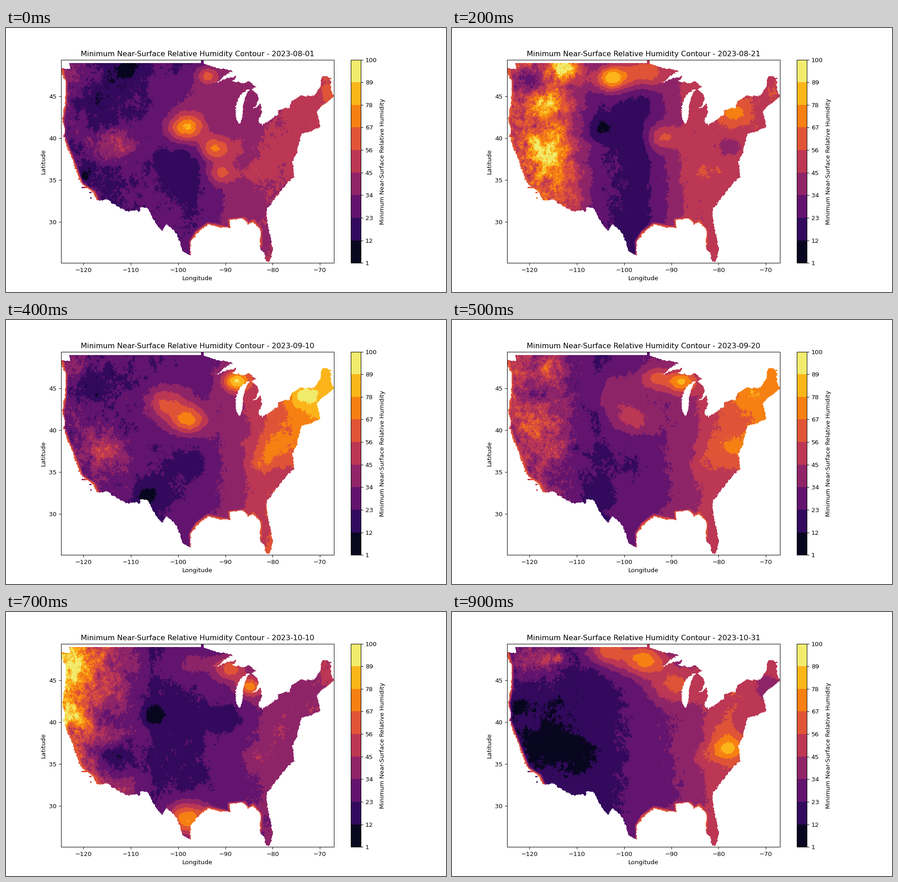
These frames come from a looping animation (966 px wide and 580 px high, 1000 ms). A matplotlib script:

```python
import numpy as np
import matplotlib.pyplot as plt
from matplotlib.animation import FuncAnimation
from matplotlib.colors import BoundaryNorm, ListedColormap
from matplotlib.path import Path

X, Y = np.meshgrid(np.arange(121, 720) + .0, np.arange(70, 517) + .0)
rng = np.random.default_rng(7)

# Capes, bays and corners of the outline, clockwise, in stage pixels
north = [
    (121, 88), (140, 91), (138, 77), (428, 77), (428, 69), (433, 69), (434, 79), (470, 90),
    (498, 93), (460, 121), (506, 104), (498, 117), (521, 121), (535, 119), (550, 130),
    (537, 135), (550, 146), (552, 158), (545, 178), (557, 167), (561, 185), (553, 208),
    (562, 215), (597, 191), (596, 181), (620, 179), (626, 164), (645, 150), (676, 150),
    (689, 130), (697, 105), (712, 109), (713, 137), (720, 151)]
atlantic = [
    (706, 164), (683, 182), (690, 218), (650, 233), (645, 256), (628, 298), (633, 327),
    (606, 355), (573, 396), (572, 425), (585, 482), (579, 516), (572, 514)]
gulf = [
    (557, 477), (557, 445), (542, 426), (532, 433), (521, 421), (491, 423), (493, 442),
    (443, 432), (418, 450), (406, 470), (407, 501)]
border = [
    (387, 491), (370, 444), (352, 431), (342, 444), (330, 433), (309, 394), (294, 394),
    (294, 402), (262, 403), (222, 378)]
pacific = [
    (200, 380), (192, 361), (166, 344), (150, 302), (130, 251), (124, 239), (126, 226),
    (123, 200), (129, 168), (130, 122), (121, 88)]


def fractal_noise(power):
    """Random relief with ridges running mostly north to south."""
    ky = np.fft.fftfreq(X.shape[0])[:, None]
    kx = np.fft.rfftfreq(X.shape[1])
    k = np.hypot(.8 * kx, ky) + .008
    noise = np.fft.irfft2(np.fft.rfft2(rng.normal(size=X.shape)) / k ** power, X.shape)
    return noise / noise.std()


def bump(x, y, rx, ry):
    return np.exp(-((X - x) / rx) ** 2 - ((Y - y) / ry) ** 2)


def coast_distance(line):
    nearest = np.full(X.shape, 1e9)
    for (ax, ay), (bx, by) in zip(line, line[1:]):
        dx, dy = bx - ax, by - ay
        t = np.clip(((X - ax) * dx + (Y - ay) * dy) / (dx * dx + dy * dy), 0, 1)
        nearest = np.minimum(nearest, np.hypot(X - ax - t * dx, Y - ay - t * dy))
    return nearest


def land_mask():
    ragged = 1.2 * np.clip((Y - 80) / 10, 0, 1)
    px = X + ragged * fractal_noise(1.3)
    py = Y + ragged * fractal_noise(1.3)
    outline = Path(north + atlantic + gulf + border + pacific)
    land = outline.contains_points(np.column_stack([px.ravel(), py.ravel()])).reshape(X.shape)
    # Great lake: a tapered band that bends east towards its northern end
    middle = 512 + .013 * np.maximum(175 - py, 0) ** 2
    half = 8 * np.sqrt(np.clip(1 - ((py - 173) / 38) ** 2, 0, 1))
    land &= np.abs(px - middle) >= half
    for x, y, w in ((172, 351, 7), (185, 362, 3), (186, 374, 2)):
        land |= ((X - x) / w) ** 2 + ((Y - y) / 2) ** 2 < 1
    return land


def weather(profile, cells):
    """West-to-east profile plus moist and dry cells (x, y, size, strength), in contour bands."""
    bands = np.interp(X, np.linspace(130, 700, len(profile)), profile)
    for x, y, size, strength in cells:
        bands += strength * bump(x, y, 1.15 * size, .9 * size)
    return bands


land = land_mask()
west = 1 / (1 + np.exp((X - 280) / 20))
mountains = bump(555, 318, 22, 18) + .5 * bump(590, 270, 25, 40)
rim = np.exp(-(np.minimum(coast_distance(gulf), coast_distance(pacific)) / 4) ** 2)
terrain = fractal_noise(1.2)

surfaces = {}
surfaces[0] = weather([2.1, 1.1, 1.7, 1.5, 3.2, 3.5, 4.6], [
    (268, 90, 28, -1.4), (185, 165, 30, -.6), (172, 322, 18, -1.2), (240, 255, 42, 2),
    (375, 310, 55, -.7), (395, 220, 34, 4.9), (458, 265, 30, 3.4), (470, 320, 25, 2.4),
    (440, 105, 22, 2.8), (420, 165, 55, 1.2)])
surfaces[2] = weather([4.6, 5.2, 1.8, 1, 3.7, 4, 4.4], [
    (165, 115, 40, -3.2), (250, 92, 25, 4.6), (200, 165, 28, 2.6), (195, 285, 45, 2.2),
    (325, 220, 34, -1.3), (350, 110, 32, 5.4), (420, 95, 42, 4), (460, 240, 30, 2.3),
    (615, 185, 30, 2), (605, 262, 24, -1.6)])
surfaces[4] = weather([2.3, 2, 1.5, 1.9, 3.1, 5.1, 6.8], [
    (190, 145, 45, -1.2), (215, 290, 36, 2), (310, 385, 32, -1.5), (350, 185, 45, 3.1),
    (400, 222, 34, 3.8), (410, 320, 45, -.9), (505, 135, 24, 4.6), (655, 168, 32, 2),
    (575, 290, 34, 1), (625, 340, 45, -1.3)])
surfaces[6] = weather([5.2, 4.2, 1.3, 2.2, 2.8, 4.5, 5], [
    (212, 110, 35, 3.6), (178, 100, 20, -2), (188, 225, 38, 3), (235, 330, 50, -1.8),
    (303, 205, 25, -1.2), (275, 285, 25, -.8), (360, 140, 35, 1.6), (445, 130, 30, 5),
    (500, 140, 28, 3), (635, 285, 32, 1.4)])
surfaces[7] = weather([6.1, 4, 1.4, 1.3, 2.2, 3, 3.6], [
    (142, 125, 32, 1.8), (142, 232, 22, 2.6), (225, 320, 50, -3), (220, 235, 30, -1.7),
    (325, 228, 28, -1.5), (410, 115, 42, 1.4), (490, 125, 30, 3), (535, 165, 22, 3.6),
    (400, 455, 42, 5), (490, 235, 38, -1.1)])
surfaces[8] = weather([2.3, 1.2, .7, .9, 2.4, 5, 5.6], [
    (140, 120, 30, 4.2), (245, 160, 55, 1.3), (260, 345, 60, -1), (350, 310, 75, -.8),
    (400, 125, 55, 1.2), (520, 140, 30, 3.8), (600, 235, 42, 1.4), (660, 182, 30, 1.4),
    (470, 370, 50, -.9), (570, 410, 50, -1.1)])
surfaces[9] = weather([1.4, 1, 1.1, 1.9, 2.7, 4.4, 3.8], [
    (195, 105, 52, 1.9), (228, 103, 14, 2.4), (200, 285, 68, -1.1), (285, 320, 52, -.8),
    (150, 205, 22, -1.2), (340, 85, 38, 4), (420, 105, 40, 4), (485, 160, 45, 2.4),
    (605, 300, 27, 2.8), (690, 165, 24, -1)])
for i in (1, 3, 5):
    surfaces[i] = (surfaces[i - 1] + surfaces[i + 1]) / 2


def humidity(i):
    bands = surfaces[i] + 1.2 * mountains
    roughness = .12 + west * (.08 + .1 * np.maximum(bands, 0)) + .2 * mountains
    bands += roughness * (.8 * terrain + .6 * fractal_noise(1.5))
    bands += np.maximum(5.2 - bands, 0) * rim
    percent = np.clip(1 + 11 * (bands + .5), 1.1, 99.9)
    return np.ma.masked_where(~land, percent)


maps = [humidity(i) for i in range(10)]
dates = "08-01 08-11 08-21 08-31 09-10 09-20 09-30 10-10 10-20 10-31".split()

NAME = "Minimum Near-Surface Relative Humidity"
levels = np.linspace(1, 100, 10)
cmap = ListedColormap(plt.get_cmap("inferno")((np.arange(9) + .5) / 9))

plt.rcParams["font.family"] = "DejaVu Sans"
fig, ax = plt.subplots(figsize=(10.0001, 6.0042), dpi=96.6)
image = ax.imshow(maps[0], cmap=cmap, norm=BoundaryNorm(levels, 9), aspect="auto",
                  interpolation="nearest", extent=(-124.77, -67.05, 25.07, 49.40))
fig.colorbar(image, ax=ax, ticks=levels, label=NAME)
ax.set_xlabel("Longitude")
ax.set_ylabel("Latitude")
title = ax.set_title("")


def update(i):
    image.set_data(maps[i])
    title.set_text(f"{NAME} Contour - 2023-{dates[i]}")
    return image, title


animation = FuncAnimation(fig, update, frames=10, interval=100, repeat=True)
plt.show()
```
